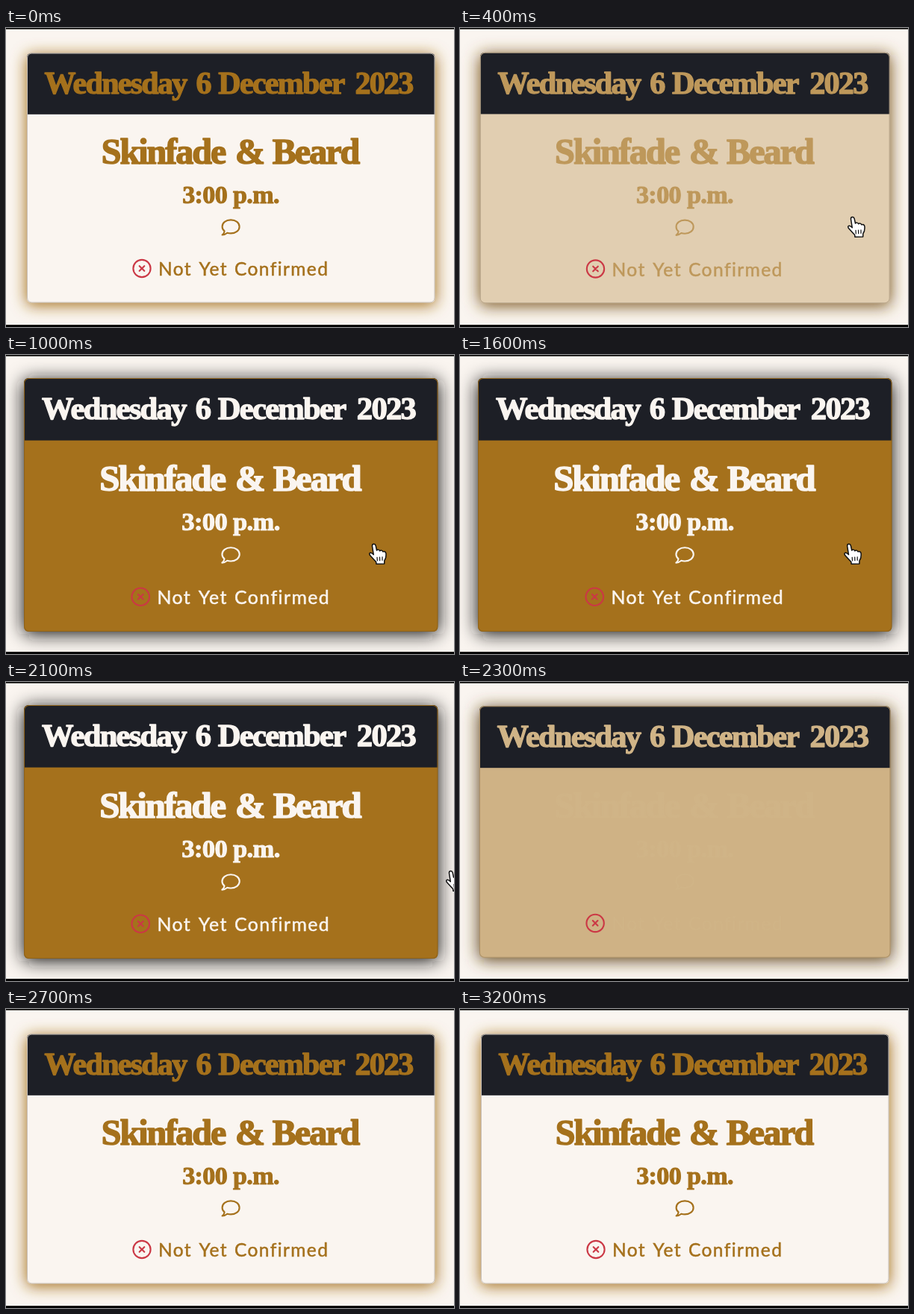
An HTML page that plays this animation: 600 by 401 pixels, repeating every 3300 ms.

```html
<!DOCTYPE html>
<html lang="en">
<head>
<meta charset="utf-8">
<title>Appointment card</title>
<style>
  html, body { margin: 0; width: 100%; height: 100%; overflow: hidden; background: #faf5f0; }
  svg { display: block; width: 100vw; height: 100vh; }
  .slab { font-family: "Liberation Serif", "Times New Roman", serif; font-weight: 700; text-anchor: middle; stroke-linejoin: round; }
  .date { font-size: 42px; letter-spacing: -1.7px; stroke-width: 1.4px; }
  .service { font-size: 48px; letter-spacing: -2px; stroke-width: 1.6px; }
  .time { font-size: 34px; letter-spacing: -.6px; stroke-width: 1.1px; }
  .status { font-family: Lato, "Open Sans", sans-serif; font-size: 24.5px; letter-spacing: 1.4px; stroke-width: .5px; }
</style>
</head>
<body>
<svg viewBox="0 0 600 401">
  <defs>
    <filter id="blur" filterUnits="userSpaceOnUse" x="-60" y="-60" width="720" height="520">
      <feGaussianBlur id="spread" stdDeviation="10"/>
    </filter>
    <clipPath id="round"><rect x="28" y="33.5" width="546.5" height="335" rx="6"/></clipPath>
  </defs>
  <rect width="600" height="401" fill="#faf5f0"/>
  <g id="card">
    <rect id="shadow" x="27" y="36" width="548.5" height="336" rx="7" filter="url(#blur)"/>
    <g clip-path="url(#round)">
      <rect id="panel" x="28" y="33.5" width="546.5" height="335"/>
      <rect x="28" y="33.5" width="546.5" height="82.3" fill="#1d1f26"/>
    </g>
    <rect id="border" x="28.5" y="34" width="545.5" height="334" rx="6" fill="none"/>
    <g id="ink">
      <text class="slab date" y="88"><tspan x="151">Wednesday</tspan> <tspan x="268.5">6</tspan> <tspan x="372.5">December</tspan> <tspan x="506">2023</tspan></text>
      <text class="slab service" y="182"><tspan x="215.5">Skinfade</tspan> <tspan x="331">&amp;</tspan> <tspan x="414.5">Beard</tspan></text>
      <text class="slab time" x="301" y="235">3:00 p.m.</text>
      <path fill="none" stroke-width="2.1" stroke-linejoin="round" transform="translate(-.4 -.8)"
        d="M290 278.3C292 276.5 293 274.5 293 273.2C291 271.5 290 269.5 290 267.2C290 262 295 258.2 301.5 258.2S313 262 313 267.2S308 276.2 301.5 276.2C299.8 276.2 298.2 276 296.8 275.5C295 277 292.8 278.2 290 278.3Z"/>
      <text class="status" y="332"><tspan x="204">Not</tspan> <tspan x="258.5">Yet</tspan> <tspan x="306">Confirmed</tspan></text>
    </g>
    <g fill="none" stroke="#cb3845" stroke-width="2.1" stroke-linecap="round">
      <circle cx="182" cy="322.5" r="11.6"/>
      <path d="M178.7 319.2l6.6 6.6m0-6.6l-6.6 6.6"/>
    </g>
  </g>
  <g id="hand" stroke="#111" stroke-width="1.5" stroke-linejoin="round" stroke-linecap="round">
    <path fill="#fff" d="M-2.5 2.5C-2.8-.8 1.5-1.2 2.2 2L3.5 8.2C4.5 6.8 7 7 7.6 9C9 7.7 11.3 8.2 11.8 10C13.5 9 15.7 10 15.9 12.3C16.3 17 15.8 19.5 13.8 22L13.7 26.2L3 26.5L2.6 23.5C0 21.5-2 18.5-4.5 16C-8 12.5-5.5 10.5-3 12L-.7 14Z"/>
    <path fill="none" stroke-width="1.2" d="M4 17.5l.3 4.5M7.5 17.2l.2 4.7M11 17v4.5"/>
  </g>
  <rect width="600" height="1.6"/>
  <rect y="398" width="600" height="3"/>
</svg>
<script>
const LOOP = 3300, TICK = 100, FADE = 500, ENTER = 300, LEAVE = 2155;
const CREAM = [250, 245, 240], GOLD = [165, 113, 28], DARK = [22, 20, 20], EDGE = [200, 192, 184], BRONZE = [142, 98, 24];
// pointer stops as [time, x]
const PATH = [[200, 590], [300, 556], [400, 531], [600, 505], [800, 498], [1300, 498], [1800, 545], [2100, 601], [2200, 630]];
const $ = id => document.getElementById(id);
const mix = (a, b, p) => `rgb(${a.map((v, i) => Math.round(v + (b[i] - v) * p))})`;
const set = (id, attrs) => Object.entries(attrs).forEach(([k, v]) => $(id).setAttribute(k, v));

// CSS "ease": cubic-bezier(.25, .1, .25, 1)
function ease(x) {
  if (x <= 0) return 0;
  if (x >= 1) return 1;
  const bez = (a, b, u) => 3 * (1 - u) ** 2 * u * a + 3 * (1 - u) * u * u * b + u ** 3;
  let lo = 0, hi = 1;
  for (let i = 0; i < 24; i++) {
    const mid = (lo + hi) / 2;
    if (bez(.25, .25, mid) < x) lo = mid; else hi = mid;
  }
  return bez(.1, 1, lo);
}

function pointerX(t) {
  const i = PATH.findIndex(([time]) => time > t);
  if (i < 1) return 700;
  const [t0, x0] = PATH[i - 1], [t1, x1] = PATH[i];
  return x0 + (x1 - x0) * (t - t0) / (t1 - t0);
}

function draw(t) {
  const p = ease((t - ENTER) / FADE) - ease((t - LEAVE) / FADE);
  const ink = mix(GOLD, CREAM, p);
  set("card", { transform: `translate(301 201) scale(${1 + .0145 * p}) translate(-301 -201)` });
  set("shadow", { fill: mix(GOLD, DARK, p) });
  set("spread", { stdDeviation: 10 + 2 * p });
  set("panel", { fill: mix(CREAM, GOLD, p) });
  set("border", { stroke: mix(EDGE, BRONZE, p) });
  set("ink", { fill: ink, stroke: ink });
  set("hand", { transform: `translate(${pointerX(t) - 5} 253.8)` });
}

function frame(now) {
  draw(Math.floor(now % LOOP / TICK) * TICK);
  requestAnimationFrame(frame);
}
draw(0);
requestAnimationFrame(frame);
</script>
</body>
</html>
```
